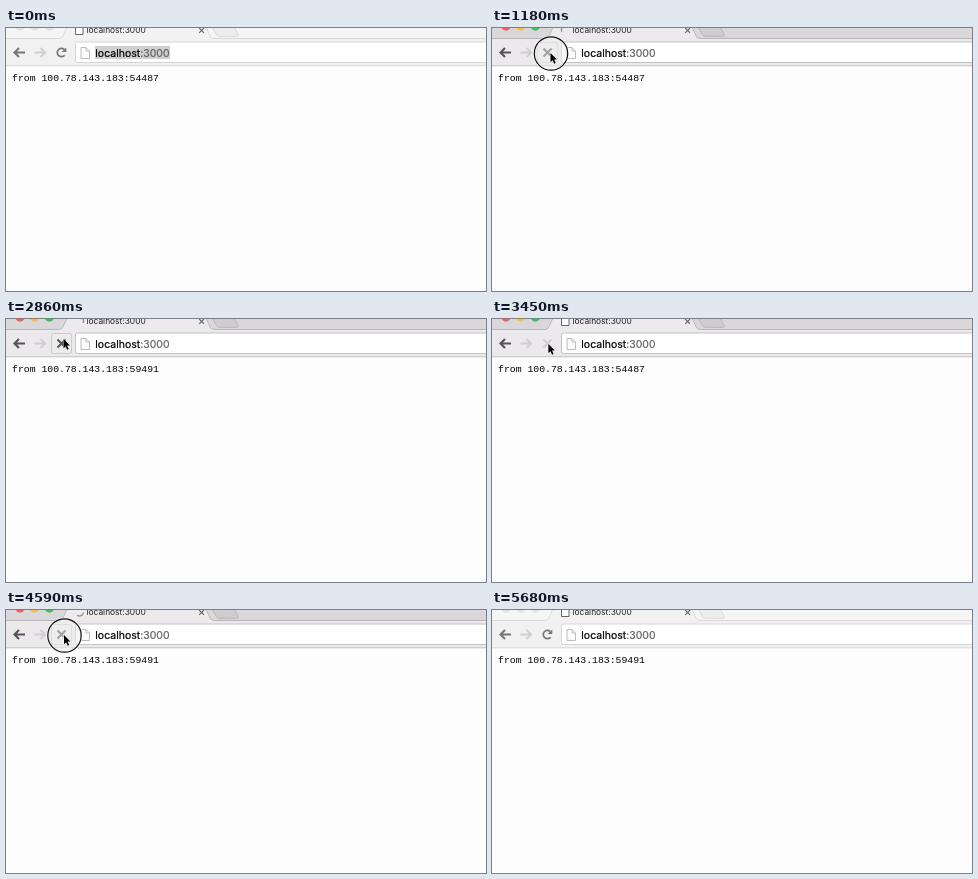
Recreate the animation shown at these times as an HTML page. Size 480x263 px, loop 6.31 s.

```html
<!DOCTYPE html>
<html lang="en">
<head>
<meta charset="utf-8">
<title>Reloading a local page</title>
<style>
  html, body { margin: 0; width: 100%; height: 100%; overflow: hidden; background: #fefdfe; }
  svg { display: block; width: 100%; height: 100%; }
  .ui { font-family: Inter, Roboto, sans-serif; }
  .url { font-size: 10.5px; stroke-width: .2; }
  .page { font: 9.8px "Liberation Mono", "DejaVu Sans Mono", monospace; fill: #000; }
  .line { fill: none; }
</style>
</head>
<body>
<svg viewBox="0 0 480 263" preserveAspectRatio="none">
  <rect width="480" height="263" fill="#fefdfe"/>
  <rect id="strip" width="480" height="11"/>
  <g id="lights">
    <circle cx="14" cy="-1.900" r="4.600"/>
    <circle cx="28.700" cy="-1.900" r="4.600"/>
    <circle cx="43.400" cy="-1.900" r="4.600"/>
  </g>
  <path id="newTab" d="M205 -3 L210.500 6.500 Q211.500 8.300 213.500 8.300 H230.500 Q233 8.300 232 6.300 L227 -3" stroke-width="1"/>
  <rect id="bar" y="10" width="480" height="28"/>
  <path id="edge" class="line" d="M0 10.500 H53 Q56 10.500 57 8 L62 -3 M199 -3 L204 8 Q205 10.500 208 10.500 H480" stroke-width="1"/>
  <path id="tab" d="M54 11 Q56.500 10.500 57.500 8 L62.500 -3 H198.500 L203.500 8 Q204.500 10.500 207 11 Z"/>
  <path id="base" class="line" d="M0 37.800 H480" stroke-width="1"/>

  <path id="tabIcon" d="M69.500 -3 H74 L77 0 V6.500 H69.500 Z" fill="#fff" stroke="#666" stroke-width="1"/>
  <path id="spinner" class="line" d="M73.500 -2 A4 4 0 0 1 77 4" stroke="#8b8b8b" stroke-width="1.300"/>
  <text class="ui" x="80.500" y="5.300" font-size="8.400" fill="#222">localhost:3000</text>
  <path class="line" d="M193.200 0 l4.800 4.800 m0 -4.800 l-4.800 4.800" stroke="#666" stroke-width="1.100"/>

  <path id="back" class="line" d="M19 24.500 H9 M13 20 L8.500 24.500 L13 29" stroke-width="2.100"/>
  <path class="line" d="M28.500 24.500 H38.500 M34.500 20 L39 24.500 L34.500 29" stroke="#d0d0d0" stroke-width="2.100"/>

  <rect id="button" x="45.500" y="14.500" width="20" height="20" rx="2" fill="#ececec" stroke="#cbcbcb"/>
  <g id="reload">
    <path class="line" d="M58.700 27.200 A4.200 4.200 0 1 1 58.300 21.400" stroke="#777" stroke-width="1.700"/>
    <path d="M60.300 19.400 V24 H55.700 Z" fill="#777"/>
  </g>
  <path id="stop" class="line" d="M51.500 20.500 l8 8 m0 -8 l-8 8" stroke-width="2.100"/>

  <rect id="field" x="69.500" y="14" width="416" height="20.500" rx="2" fill="#fff"/>
  <path d="M75 19.500 H80 L83.500 23 V30.500 H75 Z M80 19.500 V23 H83.500" fill="#fbfbfb" stroke="#bdbdbd" stroke-width="1"/>
  <rect id="selection" x="89" y="18" width="75" height="13" fill="#cfcfcf"/>
  <text class="ui url" x="89.300" y="28.600" fill="#000" stroke="#000">localhost<tspan fill="#606060" stroke="#606060">:3000</tspan></text>

  <text id="address" class="page" x="6" y="52.600"></text>

  <g id="ring">
    <circle r="17.300" fill="#efefef" fill-opacity=".5" stroke="#fff" stroke-opacity=".7" stroke-width="1.600"/>
    <circle class="line" r="16.700" stroke="#111" stroke-width="1.200"/>
  </g>
  <path id="cursor" d="M0 0 V9.200 L2.100 7.300 L3.700 10.700 L5.200 10 L3.700 6.600 H6.500 Z" fill="#000" stroke="#fff" stroke-width=".8" stroke-linejoin="round" paint-order="stroke"/>
</svg>
<script>
const LOOP = 6310;
const el = id => document.getElementById(id);
const clamp = v => Math.max(0, Math.min(1, v));
const ease = v => v * v * (3 - 2 * v);
const ramp = (t, a, b) => clamp((t - a) / (b - a));
const within = (t, spans) => spans.some(([a, b]) => t >= a && t < b);
const show = (id, on) => el(id).setAttribute("visibility", on ? "visible" : "hidden");
const paint = (id, name, value) => el(id).setAttribute(name, value);

// Inactive and active window colours, as RGB
const theme = {
  strip: ["fill", [246, 245, 246], [217, 215, 217]],
  bar: ["fill", [242, 241, 242], [235, 233, 235]],
  tab: ["fill", [243, 242, 243], [236, 234, 236]],
  edge: ["stroke", [218, 217, 218], [184, 182, 184]],
  base: ["stroke", [216, 215, 216], [196, 194, 196]],
  field: ["stroke", [214, 213, 214], [196, 194, 196]],
  back: ["stroke", [118, 118, 118], [84, 84, 84]]
};
const lights = [[252, 91, 87], [253, 188, 64], [52, 200, 74]];
const mix = (a, b, k) => `rgb(${a.map((v, i) => Math.round(v + (b[i] - v) * k))})`;

// Pointer path: time, x, y
const path = [
  [320, 176, 191], [820, 58.5, 25], [2410, 58.5, 25], [2700, 57.5, 20],
  [3050, 57.5, 20], [3640, 56, 26.5], [4060, 56, 26.5], [4360, 58, 25],
  [4910, 58, 25], [5180, 235.5, 231.5], [5500, 248, 264]
];
const loads = [[1030, 1250], [2640, 3100], [4120, 4300], [4500, 4700], [4910, 4990]];
const ready = [[0, 1030], [2410, 2640], [3990, 4120], [4410, 4500], [4990, LOOP]];
const clicks = [[830, 2090], [2440, 2640], [4020, 4240], [4430, 4600]];

function pointer(t) {
  const i = Math.max(1, path.findIndex(p => p[0] > t));
  const [a, b] = [path[i - 1], path[i]];
  const k = ease(ramp(t, a[0], b[0]));
  return [a[1] + (b[1] - a[1]) * k, a[2] + (b[2] - a[2]) * k];
}

function drawWindow(t) {
  const active = ramp(t, 1000, 1080) * (1 - ramp(t, 5520, 5670));
  for (const [id, [name, off, on]] of Object.entries(theme)) paint(id, name, mix(off, on, active));
  [...el("lights").children].forEach((dot, i) => {
    dot.setAttribute("fill", mix([225, 225, 225], lights[i], active));
  });
  paint("newTab", "fill", mix([238, 237, 238], [207, 205, 207], active));
  paint("newTab", "stroke", mix([218, 217, 218], [184, 182, 184], active));
}

function drawLoading(t) {
  const loading = within(t, loads);
  const idle = within(t, ready);
  show("reload", idle);
  show("stop", !idle);
  show("button", loading && t < 4900);
  paint("stop", "stroke", loading ? "#555" : "#cfcfcf");
  show("tabIcon", !loading);
  show("spinner", loading);
  paint("spinner", "transform", `rotate(${-(t - 2860) * .36} 73.5 2)`);
  show("selection", t < 1030);
  const count = loads.filter(span => t >= span[1]).length;
  el("address").textContent = "from 100.78.143.183:" + (count % 2 ? "59491" : "54487");
}

function drawPointer(t) {
  const visible = t > 320 && t < 5500;
  show("cursor", visible);
  const [x, y] = visible ? pointer(t) : [0, 0];
  paint("cursor", "transform", `translate(${x} ${y})`);
  const click = clicks.find(([a, b]) => t >= a && t < b + 90);
  show("ring", !!click);
  if (!click) return;
  const grow = ramp(t, click[0], click[0] + 90);
  const fade = ramp(t, click[1], click[1] + 90);
  paint("ring", "transform", `translate(${x + .5} ${y + .5}) scale(${.6 + .4 * grow + .1 * fade})`);
  paint("ring", "opacity", grow * (1 - fade));
}

function render(t) {
  drawWindow(t);
  drawLoading(t);
  drawPointer(t);
}

const start = performance.now();
function tick() {
  render((performance.now() - start) % LOOP);
  requestAnimationFrame(tick);
}
tick();
</script>
</body>
</html>
```
